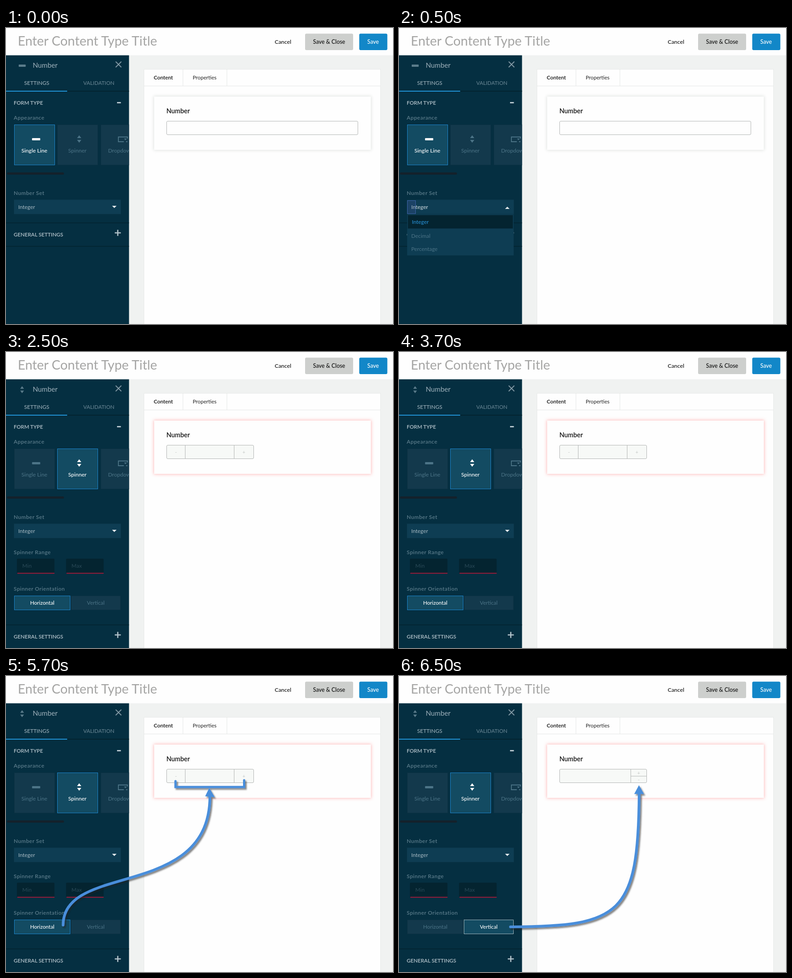
Animation of 854 by 656 pixels, one loop 8000 ms. Source, as an HTML page:

```html
<!DOCTYPE html>
<html lang="en">
<head>
<meta charset="utf-8">
<title>Number field settings</title>
<style>
  html, body { margin: 0; width: 100%; height: 100%; overflow: hidden; background: #fefefd; }
  svg { display: block; width: 854px; height: 656px; font-family: Lato, "Open Sans", sans-serif; }
  text { white-space: pre; }
</style>
</head>
<body>
<svg id="stage" viewBox="0 0 854 656" xmlns="http://www.w3.org/2000/svg"></svg>
<script>
const LOOP = 8000;
const SIDE = 271.5, TOP = 60.5;
const C = {
  side: '#052f41', line: '#03232f', tile: '#13394c', tileEdge: '#0c3143', on: '#134b62',
  blue: '#1b84cc', dim: '#4c7487', label: '#5b7c8b', soft: '#b4c3cb', white: '#fefefe',
  well: '#042430', select: '#0e3d53', arrow: '#4a8edb', edge: '#b2b5b4'
};

const rect = (x, y, w, h, fill, extra = '') =>
  `<rect x="${x}" y="${y}" width="${w}" height="${h}" fill="${fill}" ${extra}/>`;
const box = (x, y, w, h, fill, stroke, extra = '') =>
  rect(x + .5, y + .5, w - 1, h - 1, fill, `stroke="${stroke}" ${extra}`);
const path = (d, fill, extra = '') => `<path d="${d}" fill="${fill}" ${extra}/>`;
const stroke = (d, color, w, extra = '') =>
  path(d, 'none', `stroke="${color}" stroke-width="${w}" ${extra}`);
const text = (s, x, y, size, fill, weight = 400, gap = 0, anchor = 'start') =>
  `<text x="${x}" y="${y}" font-size="${size}" fill="${fill}" font-weight="${weight}" ` +
  `letter-spacing="${gap}" text-anchor="${anchor}">${s}</text>`;
const mid = (s, x, y, size, fill, weight) => text(s, x, y, size, fill, weight, 0, 'middle');
const label = (s, y) => text(s, 17, y, 12, C.label, 600, .45);
const during = (from, to, ...parts) =>
  `<g data-from="${from}" data-to="${to}">${parts.join('')}</g>`;

const bar = (x, y, w, color) => rect(x, y, w, 5, color, 'rx="1"');
const upDown = (x, y, s, color) => path(
  `M${x - s} ${y - 2}h${2 * s}l${-s} ${-s - 1.5}zM${x - s} ${y + 2}h${2 * s}l${-s} ${s + 1.5}z`, color);
const caret = (y, dir) => path(`M234 ${y}h10l-5 ${5 * dir}z`, '#e4eaed');

function tile(name, x, active, icon) {
  const color = active ? C.white : C.dim;
  return box(x, 214, 90, 90, active ? C.on : C.tile, active ? C.blue : C.tileEdge) +
    icon(color) + mid(name, x + 44.5, 275.5, 12.1, color, active ? 500 : 400);
}
const singleTile = on => tile('Single Line', 18, on, c => bar(57.5, 244, 18, c));
const spinnerTile = on => tile('Spinner', 113, on, c => upDown(161.5, 246, 4.7, c));

function card(glow, id) {
  return `<filter id="${id}" x="-10%" y="-30%" width="120%" height="160%">` +
    `<feGaussianBlur stdDeviation="3.5"/></filter>` +
    rect(326, 151, 480, 120, glow, `filter="url(#${id})"`) +
    rect(327, 152, 478, 118, C.white) +
    text('Number', 354, 189, 14.3, '#111', 600);
}

const general = y =>
  rect(0, y - 23, SIDE, 1.5, C.line) + rect(0, y + 29, SIDE, 1.5, C.line) +
  text('GENERAL SETTINGS', 17, y + 8, 11.7, C.soft, 600) +
  stroke(`M240 ${y}h13.4M246.7 ${y - 6.7}v13.4`, C.soft, 2.6);

const range = (name, x) =>
  rect(x, 458, 83, 33, C.well, 'rx="2"') + rect(x + 1, 489.5, 82, 1.7, '#b5183a') +
  text(name, x + 12, 478, 11.8, '#2b4a58', 400, .2);

function choice(name, x, w, active, edge, dash = '') {
  return box(x, 540, w, 32, active ? C.on : C.tile, active ? edge : C.tileEdge, dash) +
    mid(name, x + w / 2, 560, 11.7, active ? C.white : C.dim, active ? 500 : 400);
}

const sign = (s, x, y) => mid(s, x, y, 11, '#c3c7c5');
const control = split =>
  box(354, 206, 193, 31, '#f7f9f7', C.edge, 'rx="2.5"') + stroke(split, C.edge, 1);
const roundCap = 'stroke-linecap="round"';
const arrow = (d, head, extra = '') => `<g filter="url(#drop)">` +
  stroke(d, C.arrow, 6, roundCap) + path(head, C.arrow) + extra + '</g>';

const header =
  rect(0, 0, 854, 61, C.white) +
  text('Enter Content Type Title', 26, 39, 28.8, '#a5a5a4') +
  text('Cancel', 593, 35, 12.3, '#111', 500) +
  rect(660, 12.5, 106, 36.5, '#cdcfcd', 'rx="3"') +
  mid('Save &amp; Close', 713, 35, 12.4, '#111', 500) +
  rect(779.5, 12.5, 62, 36.5, '#1287c8', 'rx="3"') + mid('Save', 810, 35, 12.4, C.white, 500);

const page =
  rect(SIDE, TOP, 583, 596, '#f0f2f1') +
  box(304, 91, 523, 600, C.white, '#e7e9e8') +
  stroke('M304 128.5H827M390.5 91V128M487.5 91V128', '#e5e7e6', 1) +
  text('Content', 326, 114, 11.8, '#111', 600) +
  text('Properties', 412, 114, 11.6, '#222');

const sidebar =
  rect(0, TOP, SIDE, 596, C.side) +
  text('Number', 59, 88, 15.3, '#9fb2bc') +
  stroke('M242 74.5l12.5 12.5M254.5 74.5l-12.5 12.5', '#8299a4', 1.9) +
  text('SETTINGS', 40, 126.3, 12, '#a9bbc4') +
  text('VALIDATION', 170.5, 126.3, 11.7, '#6b8896') +
  rect(135, 139, SIDE - 135, 2, C.line) + rect(0, 139, 135, 2, '#2093d8') +
  text('FORM TYPE', 17, 170, 11.6, C.soft, 600) +
  rect(245, 164, 8.5, 3, C.soft) +
  label('Appearance', 203) +
  '<g clip-path="url(#rail)">' +
  tile('Dropdown', 209, false, c =>
    stroke('M268 245V241.5H248V252H260M265 252H268', c, 1.8) + path('M260.5 245h6l-3 3.6z', c)) +
  '</g>' +
  rect(2, 320, 126, 5, '#14212b', 'rx="2.5"') +
  label('Number Set', 370) +
  box(17, 380, 237, 33, C.select, '#0a3447') +
  text('Integer', 27, 401, 11.9, '#a9bbc4');

const singleLine = during(0, 2500,
  bar(28, 81, 15.5, C.label), singleTile(true), spinnerTile(false), general(454),
  card('#e0e3e1', 'grey'), box(354, 206, 423, 31, C.white, C.edge, 'rx="2.5"'));

const menu = during(500, 2500,
  box(18, 382, 19, 30, '#1b4265', '#3c62a8'),
  text('Integer', 27, 401, 11.9, '#a9bbc4'),
  caret(401, -1),
  rect(18, 413, 235, 91, C.select),
  box(19, 414, 233, 31, C.well, '#0a3447'),
  text('Integer', 28.5, 434, 11.9, '#2a97e0'),
  text('Decimal', 27, 465, 11.9, C.dim),
  text('Percentage', 27, 494, 11.9, C.dim));

const spinner = during(2500, 8000,
  upDown(35.5, 83.5, 4.2, C.label), singleTile(false), spinnerTile(true),
  label('Spinner Range', 447.5), range('Min', 24), range('Max', 132.5),
  label('Spinner Orientation', 529), general(627),
  card('#ffbcbc', 'red'));

const horizontal = during(2500, 6500,
  choice('Horizontal', 18, 124, true, C.blue), choice('Vertical', 143, 110, false),
  control('M395.5 206V237M503.5 206V237'), sign('-', 375, 226), sign('+', 525, 226));

const vertical = during(6500, 8000,
  choice('Horizontal', 18, 124, false),
  choice('Vertical', 143, 110, true, '#e8eef0', 'stroke-dasharray="2 1"'),
  control('M511.5 206V237M511.5 222H546.5'), sign('+', 529, 218.5), sign('-', 529, 233.5),
  arrow('M246 556C490 555 528 530 530 260', 'M529.5 242L519 261.5H540.5Z'));

const acrossArrow = during(4500, 6500,
  arrow('M126 552C126 412 450 497 450 266', 'M448.5 248L439.5 266.5L460.5 268.5Z',
    stroke('M374 233V246H525.5V231', C.arrow, 5, roundCap)));

const defs = `<defs>
  <clipPath id="rail"><rect x="0" y="200" width="${SIDE}" height="120"/></clipPath>
  <filter id="drop" filterUnits="userSpaceOnUse" x="90" y="200" width="500" height="400">
    <feDropShadow dx="3" dy="3.5" stdDeviation="1.6" flood-color="#222" flood-opacity=".55"/>
  </filter></defs>`;

const stage = document.getElementById('stage');
stage.innerHTML = defs + header + page + sidebar +
  during(0, 500, caret(394, 1)) + during(2500, 8000, caret(394, 1)) +
  singleLine + menu + spinner + horizontal + acrossArrow + vertical;

const layers = [...stage.querySelectorAll('g[data-from]')];
const start = performance.now();

function draw() {
  const t = Math.max(0, performance.now() - start) % LOOP;
  for (const g of layers) {
    const shown = t >= +g.dataset.from && t < +g.dataset.to;
    g.style.display = shown ? '' : 'none';
  }
  requestAnimationFrame(draw);
}
draw();
</script>
</body>
</html>
```
